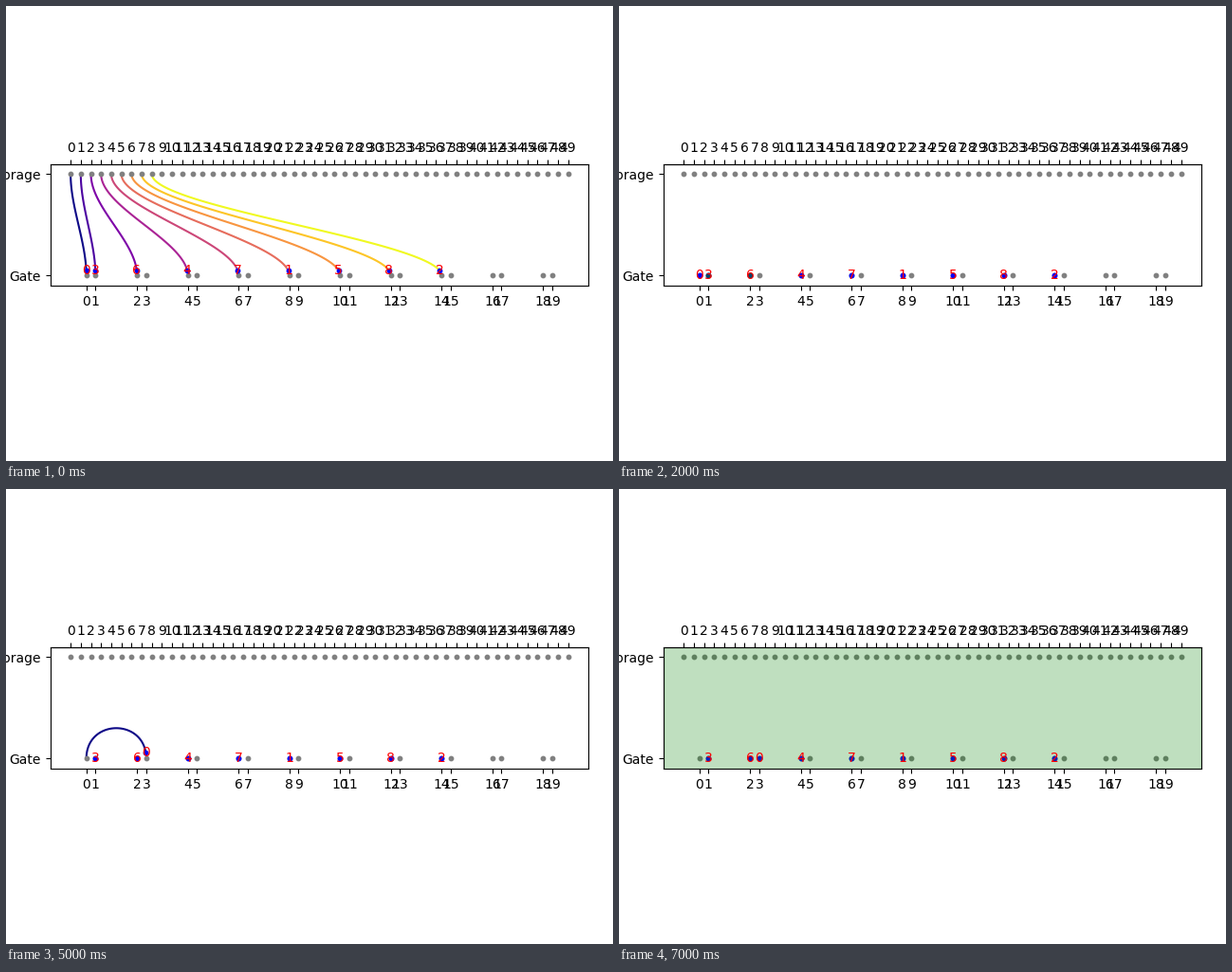
A matplotlib script for the animation above (8 s loop, 640 by 480 pixels).

```python
import numpy as np
import matplotlib.pyplot as plt
from matplotlib.animation import FuncAnimation

# Units: one storage pitch
STORAGE_Y, GATE_Y = 10, 0
PAIR_GAP = 0.9
DONE = 0.95   # part of a move travelled when it is shown
ARCH = 3      # height of a move within the gate row

storage_x = np.arange(50)
gate_x = np.array([2 + 5 * pair + side * PAIR_GAP / 2
                   for pair in range(10) for side in (-1, 1)])
qubits = [0, 3, 6, 4, 7, 1, 5, 8, 2]
sites = [0, 1, 2, 4, 6, 8, 10, 12, 14]
STEPS = ["load", "global", "local", "global",
         "entangle", "shift", "entangle", "global"]
SHIFT_STEP = STEPS.index("shift")
LOCAL_QUBITS = [3, 6]


def route(start, end):
    """Path that leaves and arrives vertically, up to the shown progress."""
    s = np.linspace(0, DONE, 60)
    ease = s * s * (3 - 2 * s)
    x = start[0] + (end[0] - start[0]) * ease
    y = start[1] + (end[1] - start[1]) * s
    if start[1] == end[1]:
        y = y + 4 * ARCH * s * (1 - s)
    return x, y


fig, ax = plt.subplots(figsize=(6.4, 4.8), dpi=100)
fig.tight_layout()
ax.set_aspect("equal")

ax.scatter(storage_x, np.full(50, STORAGE_Y), c="gray", s=10)
ax.scatter(gate_x, np.full(20, GATE_Y), c="gray", s=10)
dots = ax.scatter(gate_x[sites], np.zeros(9), c="b", s=10)
local = ax.scatter([gate_x[1], gate_x[2]], [GATE_Y, GATE_Y],
                   c="g", s=10, alpha=0.5)
labels = [ax.text(0, 0, str(q), color="red", ha="center", va="center")
          for q in qubits]
trails = [ax.plot([], [], color=c, zorder=0.9)[0]
          for c in plt.cm.plasma(np.linspace(0, 1, 9))]
flood = ax.axhspan(-5, 15, color="green", alpha=0.25)
band = ax.axhspan(GATE_Y - 0.5, GATE_Y + 0.5, color="red", alpha=0.25)

ax.set_xlim(-2, 51)
ax.set_ylim(-1, 11)
ax.set_xticks(gate_x, [str(i) for i in range(20)])
ax.set_yticks([GATE_Y, STORAGE_Y], ["Gate", "Storage"])
top = ax.secondary_xaxis("top")
top.set_xticks(storage_x, [str(i) for i in range(50)])


def update(n):
    step = STEPS[n]
    pos = np.column_stack([gate_x[sites], np.zeros(9)])
    if n > SHIFT_STEP:
        pos[0, 0] = gate_x[3]

    for trail in trails:
        trail.set_data([], [])
    moves = {}
    if step == "load":
        moves = {i: ((storage_x[i], STORAGE_Y), pos[i].copy())
                 for i in range(9)}
    elif step == "shift":
        moves = {0: (pos[0].copy(), (gate_x[3], GATE_Y))}
    for i, (start, end) in moves.items():
        x, y = route(start, end)
        trails[i].set_data(x, y)
        pos[i] = x[-1], y[-1]

    dots.set_offsets(pos)
    for label, p in zip(labels, pos):
        label.set_position(p)
    local.set_offsets([pos[qubits.index(q)] for q in LOCAL_QUBITS])
    local.set_visible(step == "local")
    flood.set_visible(step == "global")
    band.set_visible(step == "entangle")
    return []


anim = FuncAnimation(fig, update, frames=len(STEPS), interval=1000,
                     repeat=True, repeat_delay=0, blit=False)
plt.show()
```
